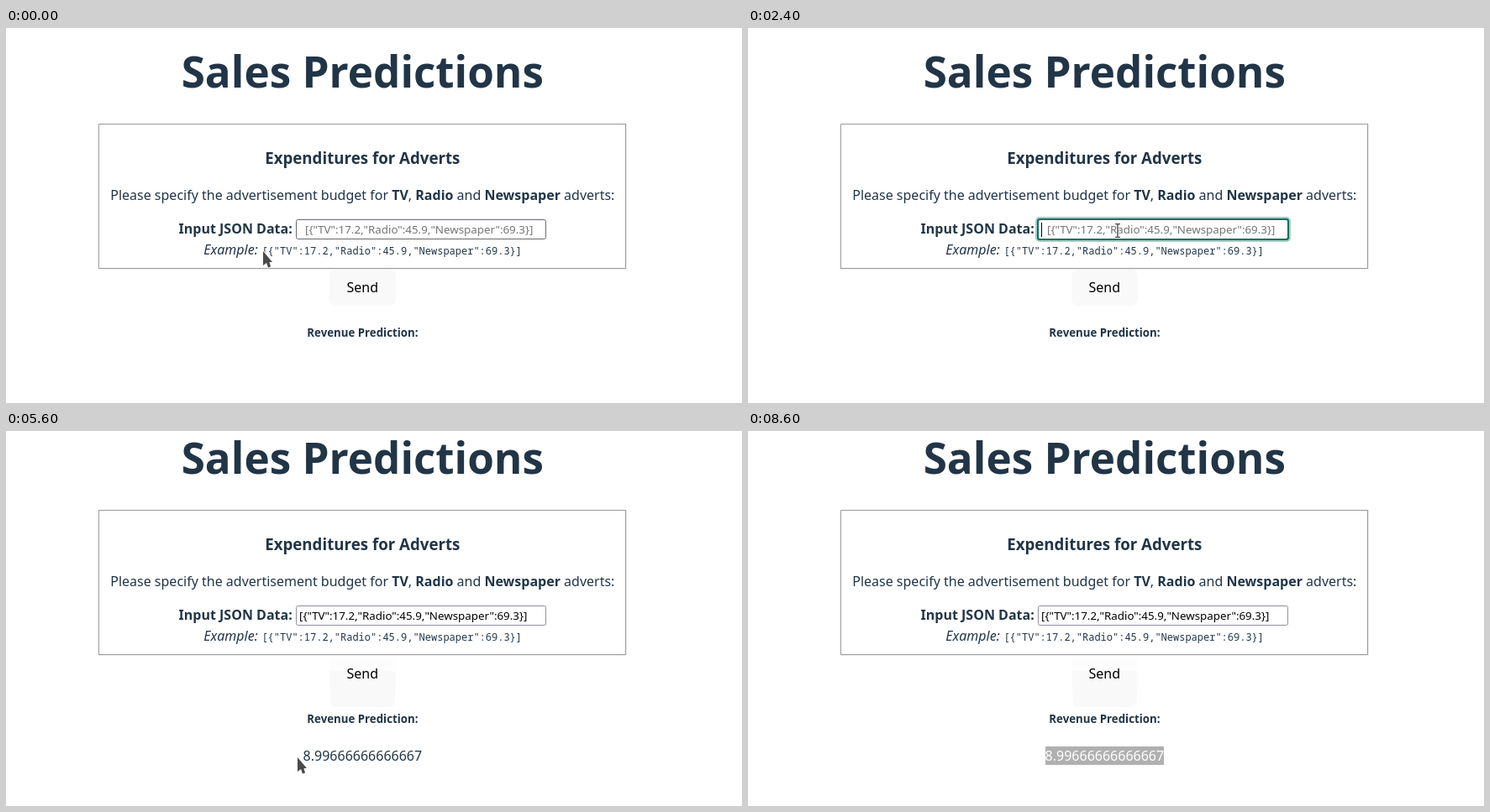
An HTML page that plays this animation: 876 by 447 pixels, repeating every 8700 ms.

```html
<!DOCTYPE html>
<html lang="en">
<head>
<meta charset="utf-8">
<title>Sales Predictions</title>
<style>
  html, body { margin: 0; width: 100%; height: 100%; overflow: hidden; background: #fff; }
  svg { display: block; width: 876px; height: 447px; font: 16px "Noto Sans", sans-serif; fill: #213547; }
  text { white-space: pre; }
  .bold { font-weight: 700; }
  .mid { text-anchor: middle; }
  .field { font-size: 13.333px; }
  .code { font: 12px "Noto Sans Mono", monospace; }
  .cursor { fill: #4a4a4a; stroke: #fff; stroke-width: 1.6; paint-order: stroke; stroke-linejoin: round; }
</style>
</head>
<body>
<svg viewBox="0 0 876 447">
  <defs>
    <clipPath id="codeClip"><rect id="codeClipRect" x="304" y="257" height="17"/></clipPath>
    <clipPath id="resultClip"><rect id="resultClipRect" x="354" y="396" height="22"/></clipPath>
  </defs>
  <g id="page">
    <text class="mid bold" x="424.3" y="71" font-size="51.2">Sales Predictions</text>

    <g fill="none" stroke="#9a9a9a">
      <path d="M110.5 287V114.5H738"/>
      <path d="M111 286.5H737.5V115"/>
      <path d="M110 287.5H738.5V114" stroke="#ededed"/>
    </g>
    <text class="mid bold" x="424.3" y="162" font-size="18.72">Expenditures for Adverts</text>
    <text class="mid" x="424.3" y="205">Please specify the advertisement budget for <tspan class="bold">TV</tspan>, <tspan class="bold">Radio</tspan> and <tspan class="bold">Newspaper</tspan> adverts:</text>

    <text class="bold" x="205.6" y="245">Input JSON Data:</text>
    <rect id="inputBox" x="345.5" y="228.5" width="297" height="23" rx="2" fill="#fff"/>
    <g id="focusRing" fill="none" stroke-width="2">
      <rect x="343" y="226" width="302" height="28" rx="4" stroke="#a6cfc5"/>
      <rect x="345" y="228" width="298" height="24" rx="2" stroke="#00705a"/>
    </g>
    <text id="placeholder" class="field" x="356" y="245" fill="#757575"></text>
    <text id="value" class="field" x="349" y="245" fill="#000"></text>
    <rect id="caret" y="232" width="1" height="17" fill="#000"/>

    <text x="235.3" y="270" font-style="italic">Example:</text>
    <text class="code json" x="304.4" y="270"></text>
    <g clip-path="url(#codeClip)">
      <rect x="304" y="257" width="310" height="17" fill="#3399ff"/>
      <text class="code json" x="304.4" y="270" fill="#fff"></text>
    </g>

    <rect id="button" x="385" y="288" width="79" height="43" rx="8"/>
    <path id="shade" d="M386 306H463V341Q463 349 455 349H394Q386 349 386 341Z" fill="#f9f9f9"/>
    <rect id="buttonBorder" x="385.5" y="288.5" width="78" height="42" rx="7.5" fill="none" stroke="#646cff"/>
    <text class="mid" x="424.3" y="315" font-weight="500" fill="#000">Send</text>

    <text class="mid bold" x="424.4" y="368" font-size="13.28">Revenue Prediction:</text>
    <g id="result">
      <text class="mid" x="424.4" y="413">8.99666666666667</text>
      <g clip-path="url(#resultClip)">
        <rect id="resultMark" x="354" y="396" width="141" height="22"/>
        <text class="mid" x="424.4" y="413" fill="#fff">8.99666666666667</text>
      </g>
    </g>
  </g>
  <g id="pointer" class="cursor">
    <path id="arrow" d="M0 0V17L4 14L6 19.5L9 18.5L7.5 13H11Z"/>
    <path id="hand" d="M-2.3 1Q0 -1.6 2.3 1V6.5L9 8.3Q11.2 9 11 12L9.5 20H0L-8 10.5Q-8.6 7.8 -5.8 8.6L-2.3 11Z"/>
    <path id="beam" d="M-3 0H3V1.3H.7V15.7H3V17H-3V15.7H-.7V1.3H-3Z"/>
  </g>
</svg>
<script>
const LOOP = 8700, STEP = 100;
const JSON_TEXT = '[{"TV":17.2,"Radio":45.9,"Newspaper":69.3}]';
const $ = id => document.getElementById(id);
const set = (id, attrs) => { for (const k in attrs) $(id).setAttribute(k, attrs[k]); };
const show = (id, on) => set(id, { visibility: on ? 'visible' : 'hidden' });
const clamp = (v, lo, hi) => Math.min(hi, Math.max(lo, v));

// Pointer stops: time, x, y
const PATH = [
  [200, 306, 266], [300, 314, 268], [400, 314, 268], [500, 380, 270], [700, 482, 281],
  [1000, 482, 281], [1300, 319, 265], [1400, 319, 265], [1600, 338, 262], [1900, 400, 210],
  [2200, 440, 233], [2800, 440, 233], [3300, 422, 319], [3400, 422, 319], [3700, 437, 307],
  [4400, 437, 307], [5300, 346, 388], [5400, 347, 389], [5600, 347, 389], [6300, 515, 401],
  [6600, 515, 401], [7500, 49, 8], [7600, 47, 1], [7700, 46, -30]
];

const smooth = u => u * u * (3 - 2 * u);

function pointerAt(t) {
  const i = PATH.findIndex(p => p[0] >= t);
  if (i < 0) return PATH[PATH.length - 1].slice(1);
  if (i === 0) return PATH[0].slice(1);
  const [t0, x0, y0] = PATH[i - 1], [t1, x1, y1] = PATH[i];
  const k = smooth((t - t0) / (t1 - t0));
  return [x0 + (x1 - x0) * k, y0 + (y1 - y0) * k];
}

// Width of a selection that ends at the nearest character edge
function dragWidth(x, left, width, chars) {
  const cell = width / chars;
  return clamp(Math.round((x - left) / cell), 0, chars) * cell;
}

document.querySelectorAll('.json').forEach(el => el.textContent = JSON_TEXT);
$('placeholder').textContent = $('value').textContent = JSON_TEXT;

function draw(t) {
  const [x, y] = pointerAt(t);
  const scrolled = t >= 4200;
  const focused = t >= 2400 && t < 4000;
  const filled = t >= 2900;
  const hover = clamp((t - 3000) / 250, 0, 1) * clamp((4950 - t) / 250, 0, 1);

  set('page', { transform: `translate(0 ${scrolled ? -20 : 0})` });
  set('inputBox', { stroke: t < 2400 ? '#676774' : '#8f8f9d' });
  show('focusRing', focused);
  show('placeholder', !filled);
  show('value', filled);
  show('caret', focused);
  set('caret', { x: filled ? 620 : 349 });

  let codeWidth = 0;
  if (t >= 300 && t < 2400) codeWidth = t >= 700 ? 310 : dragWidth(x, 304, 310, 43);
  set('codeClipRect', { width: codeWidth });

  set('button', { fill: scrolled ? '#fdfdfd' : '#f9f9f9' });
  set('buttonBorder', { 'stroke-opacity': hover });
  show('shade', scrolled);
  show('result', scrolled);

  const resultWidth = t <= 5600 ? 0 : t >= 6300 ? 141 : dragWidth(x, 354, 141, 16);
  set('resultClipRect', { width: resultWidth });
  set('resultMark', { fill: t >= 8600 ? '#b0b0b0' : '#3399ff' });

  const overButton = t >= 3100 && t < 4700;
  const overText = (t >= 2100 && t < 3000) || (t > 5600 && t < 6200);
  set('pointer', { transform: `translate(${Math.round(x)} ${Math.round(y)})` });
  show('hand', overButton);
  show('beam', overText);
  show('arrow', !overButton && !overText);
}

const start = performance.now();
function tick() {
  const t = (performance.now() - start) % LOOP;
  draw(Math.floor(t / STEP) * STEP);
  requestAnimationFrame(tick);
}
draw(0);
requestAnimationFrame(tick);
</script>
</body>
</html>
```
